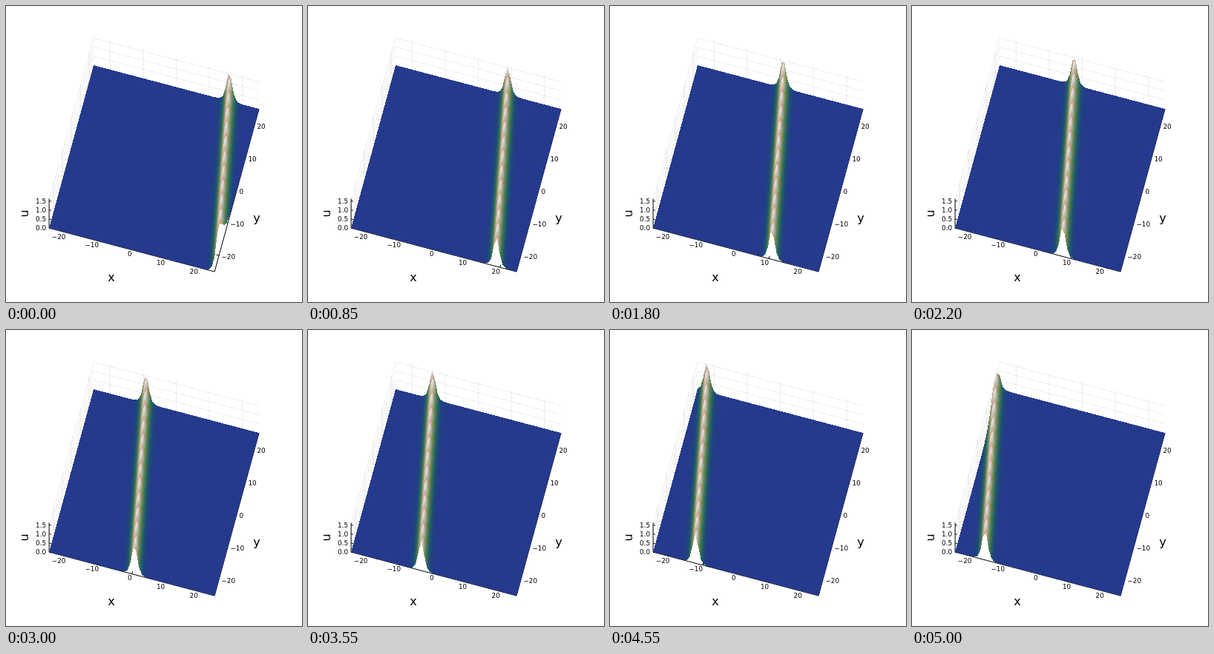
Write an HTML page with a canvas that moves like this. It is 399x400 px and loops after 5050 ms.

```html
<!DOCTYPE html>
<html lang="en">
<head>
<meta charset="utf-8">
<title>Line soliton</title>
<style>
  html, body { margin: 0; width: 100%; height: 100%; overflow: hidden; background: #fff; }
  svg, canvas { position: absolute; left: 0; top: 0; }
  text { font-family: "DejaVu Sans", sans-serif; font-size: 8.8px; fill: #000; }
  .name { font-size: 16px; text-anchor: middle; }
  .grid { stroke: #000; stroke-opacity: .08; stroke-width: 1; }
  .axis { stroke: #000; stroke-width: 1; }
</style>
</head>
<body>
<svg id="axes" width="399" height="400" viewBox="0 0 399 400"></svg>
<canvas id="surface" width="399" height="400"></canvas>
<script>
const WIDTH = 399, HEIGHT = 400;
const LIMIT = 25, POINTS = 60, PEAK = 1.62;
const STEP_MS = 50, STEPS = 101;
const TICKS = [-20, -10, 0, 10, 20];

const project = (x, y, u) => [
  199.6 + 4.46 * x + 1.2 * y,
  219.6 + 1.18 * x - 4.4 * y - 24.5 * u
];

// Grid, axes and labels
const axes = document.getElementById("axes");

function add(tag, attributes, content = "") {
  const node = document.createElementNS("http://www.w3.org/2000/svg", tag);
  for (const key in attributes) node.setAttribute(key, attributes[key]);
  node.textContent = content;
  axes.append(node);
}

function line(kind, from, to) {
  const [x1, y1] = project(...from), [x2, y2] = project(...to);
  add("line", { class: kind, x1, y1, x2, y2 });
}

function label(at, dx, dy, anchor, content) {
  const [x, y] = project(...at);
  add("text", { x: x + dx, y: y + dy, "text-anchor": anchor }, content);
}

const signed = v => String(v).replace("-", "\u2212");

for (const v of TICKS) {
  line("grid", [v, LIMIT, 0], [v, LIMIT, PEAK]);
  line("grid", [-LIMIT, v, 0], [-LIMIT, v, PEAK]);
}
for (const u of [0, 0.5, 1, 1.5]) {
  line("grid", [-LIMIT, LIMIT, u], [LIMIT, LIMIT, u]);
  line("grid", [-LIMIT, LIMIT, u], [-LIMIT, -LIMIT, u]);
  line("axis", [-LIMIT, -LIMIT, u], [-LIMIT + 0.6, -LIMIT, u]);
  label([-LIMIT, -LIMIT, u], -4, 3.2, "end", u.toFixed(1));
}
line("axis", [-LIMIT, -LIMIT, 0], [LIMIT, -LIMIT, 0]);
line("axis", [LIMIT, -LIMIT, 0], [LIMIT, LIMIT, 0]);
line("axis", [-LIMIT, -LIMIT, 0], [-LIMIT, -LIMIT, PEAK]);
for (const v of TICKS) {
  line("axis", [v, -LIMIT, 0], [v, -LIMIT + 0.8, 0]);
  line("axis", [LIMIT, v, 0], [LIMIT - 0.8, v, 0]);
  label([v, -LIMIT, 0], 0, 8.6, "end", signed(v));
  label([LIMIT, v, 0], 3.4, 5.2, "start", signed(v));
}
add("text", { class: "name", x: 142, y: 371.5 }, "x");
add("text", { class: "name", x: 338, y: 291.5 }, "y");
add("text", { class: "name", transform: "translate(30 280.5) rotate(-90)" }, "u");

// Surface
const ctx = document.getElementById("surface").getContext("2d");
const image = ctx.createImageData(WIDTH, HEIGHT);
const pixels = image.data;

const PALETTE = [
  [0, 37, 58, 140], [0.05, 29, 72, 120], [0.12, 30, 94, 106],
  [0.22, 42, 115, 86], [0.35, 72, 128, 66], [0.5, 125, 140, 75],
  [0.65, 165, 141, 90], [0.78, 186, 156, 132], [0.9, 210, 192, 190],
  [1, 240, 236, 240]
];

function colorAt(level) {
  const k = Math.max(1, PALETTE.findIndex(stop => stop[0] >= level));
  const a = PALETTE[k - 1], b = PALETTE[k];
  const f = (level - a[0]) / (b[0] - a[0]);
  return [1, 2, 3].map(c => a[c] + f * (b[c] - a[c]));
}

const coordinate = i => -LIMIT + 2 * LIMIT * i / (POINTS - 1);

// Soliton with wave numbers 1 and -0.8
const height = (x, y, t) => PEAK / Math.cosh(0.9 * (x + 0.2 * y + 0.84 * t)) ** 2;

function vertex(i, j, t) {
  const x = coordinate(i), y = coordinate(j), u = height(x, y, t);
  const [px, py] = project(x, y, u);
  return { x: px, y: py, color: colorAt(Math.min(1, u / PEAK)) };
}

const cross = (a, b, x, y) => (b.x - a.x) * (y - a.y) - (b.y - a.y) * (x - a.x);

function fillTriangle(a, b, c) {
  const area = cross(a, b, c.x, c.y);
  if (Math.abs(area) < 1e-6) return;
  const left = Math.floor(Math.min(a.x, b.x, c.x)), right = Math.ceil(Math.max(a.x, b.x, c.x));
  const top = Math.floor(Math.min(a.y, b.y, c.y)), bottom = Math.ceil(Math.max(a.y, b.y, c.y));
  for (let y = top; y < bottom; y++) {
    for (let x = left; x < right; x++) {
      const wa = cross(b, c, x + 0.5, y + 0.5) / area;
      const wb = cross(c, a, x + 0.5, y + 0.5) / area;
      const wc = 1 - wa - wb;
      if (wa < -1e-6 || wb < -1e-6 || wc < -1e-6) continue;
      const p = 4 * (y * WIDTH + x);
      for (let k = 0; k < 3; k++) {
        pixels[p + k] = wa * a.color[k] + wb * b.color[k] + wc * c.color[k];
      }
      pixels[p + 3] = 255;
    }
  }
}

// Cells are painted from the far corner to the near one.
function drawSurface(t) {
  pixels.fill(0);
  const row = j => Array.from({ length: POINTS }, (_, i) => vertex(i, j, t));
  let far = row(POINTS - 1);
  for (let j = POINTS - 2; j >= 0; j--) {
    const near = row(j);
    for (let i = 0; i < POINTS - 1; i++) {
      fillTriangle(far[i], far[i + 1], near[i]);
      fillTriangle(far[i + 1], near[i + 1], near[i]);
    }
    far = near;
  }
  ctx.putImageData(image, 0, 0);
}

let shown = -1;
function tick() {
  const step = Math.floor(performance.now() / STEP_MS) % STEPS;
  if (step !== shown) {
    shown = step;
    drawSurface(-LIMIT + step / 2);
  }
  requestAnimationFrame(tick);
}
tick();
</script>
</body>
</html>
```
